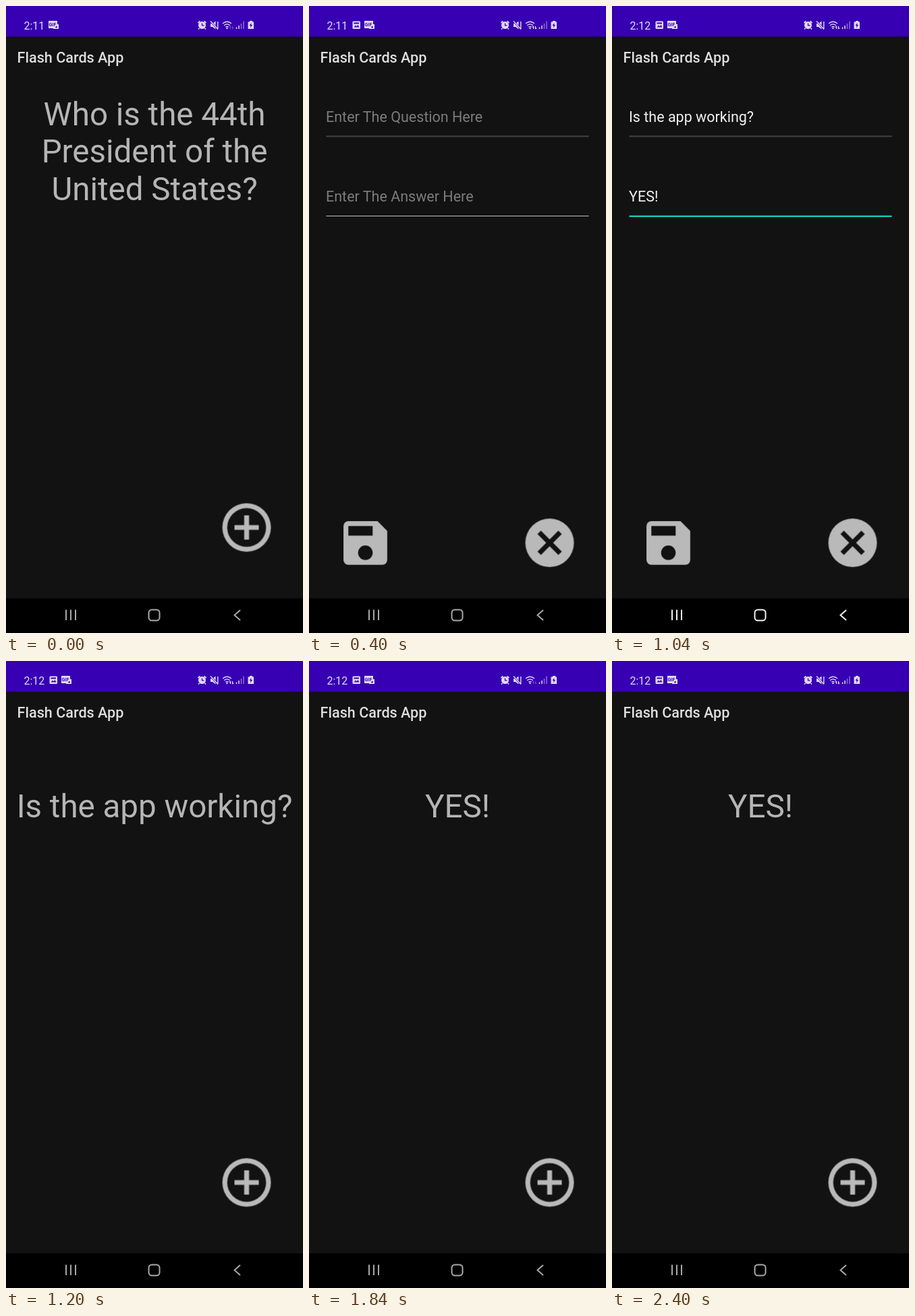
Animation, 440 px wide and 930 px high, one loop 2800 ms. Source, as an HTML page:

```html
<!DOCTYPE html>
<html lang="en">
<head>
<meta charset="utf-8">
<title>Flash Cards App</title>
<style>
  html, body { margin: 0; width: 100%; height: 100%; overflow: hidden; background: #121212; }
  svg { display: block; width: 440px; height: 930px; font-family: Roboto, sans-serif; }
  .big { font-size: 47.5px; text-anchor: middle; fill: #b5b5b5; }
  .field { font-size: 21.5px; }
  .hint { fill: #7c7c7c; }
  .typed { fill: #f2f2f2; }
  .icon { fill: #b9b9b9; }
  .status { fill: #e2d9f4; }
  .line { fill: none; stroke: #e2d9f4; }

  /* Seven equal steps of 400 ms; every change is a hard cut. */
  [class*="on-"] { animation: 2800ms step-end infinite; }
  .on-start { animation-name: start; }
  .on-later { animation-name: later; }
  .on-early { animation-name: early; }
  .on-late { animation-name: late; }
  .on-card { animation-name: card; }
  .on-form { animation-name: form; }
  .on-empty { animation-name: empty; }
  .on-filled { animation-name: filled; }
  .on-ask { animation-name: ask; }
  .on-reply { animation-name: reply; }
  .on-traffic { animation-name: traffic; }
  .on-nav { animation-name: nav; }

  @keyframes start { 0% { opacity: 1 } 14.2857%, 100% { opacity: 0 } }
  @keyframes later { 0% { opacity: 0 } 14.2857%, 100% { opacity: 1 } }
  @keyframes early { 0% { opacity: 1 } 28.5714%, 100% { opacity: 0 } }
  @keyframes late { 0% { opacity: 0 } 28.5714%, 100% { opacity: 1 } }
  @keyframes card {
    0%, 42.8571%, 85.7143%, 100% { opacity: 1 }
    14.2857%, 71.4286% { opacity: 0 }
  }
  @keyframes form {
    0%, 42.8571%, 85.7143%, 100% { opacity: 0 }
    14.2857%, 71.4286% { opacity: 1 }
  }
  @keyframes empty {
    0%, 28.5714%, 85.7143%, 100% { opacity: 0 }
    14.2857%, 71.4286% { opacity: 1 }
  }
  @keyframes filled { 0%, 42.8571%, 100% { opacity: 0 } 28.5714% { opacity: 1 } }
  @keyframes ask { 0%, 57.1429%, 100% { opacity: 0 } 42.8571% { opacity: 1 } }
  @keyframes reply {
    0%, 71.4286% { opacity: 0 }
    57.1429%, 85.7143%, 100% { opacity: 1 }
  }
  @keyframes traffic {
    0%, 57.1429% { opacity: .3 }
    14.2857%, 85.7143%, 100% { opacity: 1 }
  }
  @keyframes nav { 0%, 42.8571%, 100% { stroke: #a9a9a9 } 28.5714% { stroke: #f4f4f4 } }
</style>
</head>
<body>
<svg viewBox="0 0 440 930">
  <defs>
    <g id="recorder">
      <path class="status" d="M1 22h13v5h2v7h-8v-1H1z"/>
      <text x="1.6" y="30.4" font-size="7" font-weight="700" fill="#3700b3">GIF</text>
      <circle cx="12.6" cy="31.2" r="1.2" fill="#3700b3"/>
    </g>
  </defs>

  <rect width="440" height="930" fill="#121212"/>
  <rect width="440" height="45.5" fill="#3700b3"/>
  <rect y="878.5" width="440" height="51.5" fill="#000"/>

  <!-- Status bar -->
  <g class="status" font-size="16">
    <text class="on-early" x="26.5" y="34.5">2:11</text>
    <text class="on-late" x="26.5" y="34.5">2:12</text>
  </g>
  <use href="#recorder" x="62" class="on-start"/>
  <g class="on-later">
    <rect class="status" x="64.5" y="22.5" width="11.5" height="11.5" rx="1.5"/>
    <path d="M66.5 31.5l2.5-3 1.7 1.8 1.8-2.3 2 3.5zM66.5 24.5h7.5v2h-7.5z" fill="#3700b3"/>
    <use href="#recorder" x="81"/>
  </g>

  <circle class="status" cx="290.5" cy="28.5" r="5.5"/>
  <path class="line" d="M284.5 25l3-2.5M296.5 25l-3-2.5M286.5 33l-1.5 1.5M294.5 33l1.5 1.5" stroke-width="1.7"/>
  <path d="M290.5 25.5v3.3h3" fill="none" stroke="#3700b3" stroke-width="1.3"/>
  <path class="status" d="M303 26h3l4.5-3.5v12L306 31h-3z"/>
  <path d="M303 22.5l11 12" stroke="#3700b3" stroke-width="2.6"/>
  <path class="line" d="M303 22.5l11 12M313.8 23v11" stroke-width="1.4"/>
  <g class="line" stroke-width="1.3">
    <path d="M321 26q6.500-5.500 13 0M323.200 28.700q4.300-3.600 8.600 0M325.400 31.200q2.100-1.700 4.200 0"/>
    <path class="on-traffic" d="M332.500 34v-4M335.500 30v4M331 31.500l1.500-1.500M337 32.500l-1.500 1.500"/>
  </g>
  <circle class="status" cx="327.5" cy="33" r="1.2"/>
  <path class="line" d="M341.500 34v-2.500M345 34v-5" stroke-width="1.5"/>
  <path class="line" d="M348.500 34v-8M352 34V22.500" stroke-width="1.5" opacity=".5"/>
  <path class="status" d="M361 22h4v1.500h2V34h-8.500V23.500H361z"/>
  <path d="M363.500 25l-3 4h2l-.6 3.500 3.300-4.500h-2z" fill="#3700b3"/>

  <text x="16.600" y="84.300" font-size="21.600" font-weight="500" fill="#dedede">Flash Cards App</text>

  <!-- Card screen -->
  <g class="on-card">
    <g transform="translate(313.300 730.300) scale(3.600)">
      <path class="icon" fill-rule="evenodd" d="M12 2a10 10 0 1 0 0 20a10 10 0 1 0 0-20zm0 2a8 8 0 1 1 0 16a8 8 0 1 1 0-16zM11 7h2v4h4v2h-4v4h-2v-4H7v-2h4z"/>
    </g>
  </g>
  <g class="big on-start">
    <text x="220" y="176.500">Who is the 44th</text>
    <text x="220" y="232">President of the</text>
    <text x="220" y="287.500">United States?</text>
  </g>
  <text class="big on-ask" x="220" y="232">Is the app working?</text>
  <text class="big on-reply" x="220" y="232">YES!</text>

  <!-- Form screen -->
  <g class="on-form">
    <rect x="25.500" y="192.300" width="389" height="2" fill="#434343"/>
    <g transform="translate(40.300 753.300) scale(3.600)">
      <path class="icon" fill-rule="evenodd" d="M17 3H5a2 2 0 0 0-2 2v14a2 2 0 0 0 2 2h14a2 2 0 0 0 2-2V7zM12 13a3 3 0 1 1 0 6a3 3 0 1 1 0-6zM5 5h10v4H5z"/>
    </g>
    <g transform="translate(313.300 753) scale(3.600)">
      <path class="icon" fill-rule="evenodd" d="M12 2a10 10 0 1 0 0 20a10 10 0 1 0 0-20zM17 15.590L15.590 17 12 13.410 8.410 17 7 15.590 10.590 12 7 8.410 8.410 7 12 10.590 15.590 7 17 8.410 13.410 12z"/>
    </g>
  </g>
  <g class="field hint on-empty">
    <text x="25" y="172.300">Enter The Question Here</text>
    <text x="25" y="290.300">Enter The Answer Here</text>
    <rect x="25.500" y="311" width="389" height="1" fill="#c4c4c4"/>
  </g>
  <g class="field typed on-filled">
    <text x="25" y="172.300">Is the app working?</text>
    <text x="25" y="290.300">YES!</text>
    <rect x="25.500" y="310.700" width="389" height="2.300" fill="#10cebc"/>
  </g>

  <!-- Navigation bar -->
  <g class="on-nav" fill="none" stroke-width="2">
    <path d="M89 895.500v15.500M96 895.500v15.500M103 895.500v15.500"/>
    <rect x="211.500" y="895.500" width="16" height="16" rx="4.500"/>
    <path d="M347 896l-8.500 7.500 8.500 7.500"/>
  </g>
</svg>
</body>
</html>
```
